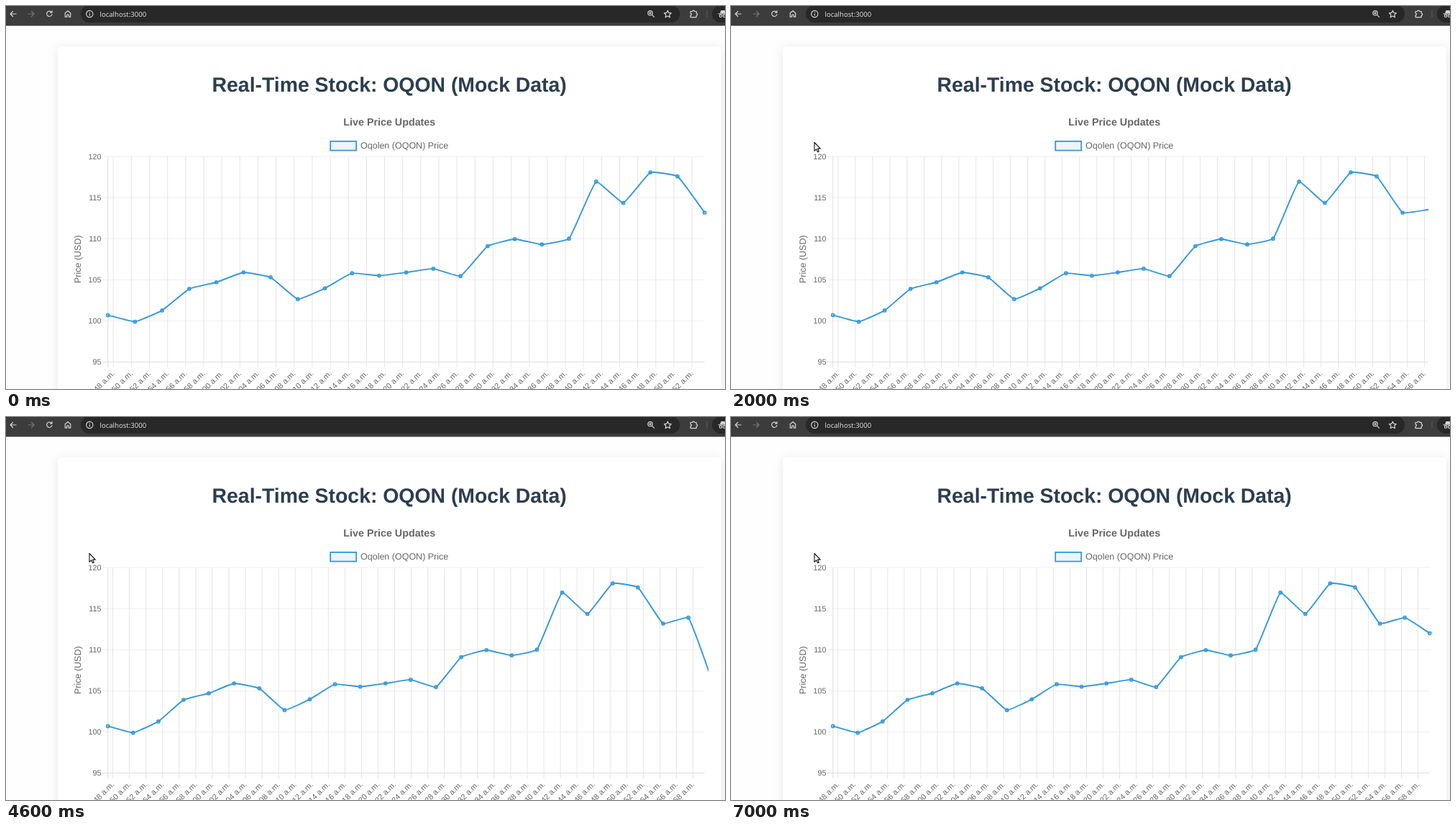
Animation of 1000x532 px, one loop 7.2 s. Source, as an HTML page:

```html
<!DOCTYPE html>
<html lang="en">
<head>
<meta charset="utf-8">
<title>Live price chart</title>
<style>
  html, body { margin: 0; width: 100%; height: 100%; overflow: hidden; background: #fefefe; }
  svg { display: block; width: 100%; height: 100%; }
  text { font-family: "Liberation Sans", Arial, sans-serif; fill: #666; text-rendering: geometricPrecision; }
  .icon { fill: none; stroke: #d4d4d4; stroke-width: 1.2; stroke-linecap: round; stroke-linejoin: round; }
  .small { font-size: 10.8px; }
  .mid { font-size: 12.5px; }
</style>
</head>
<body>
<svg viewBox="0 0 1000 532">
  <defs>
    <filter id="shadow" x="-5%" y="-10%" width="110%" height="120%">
      <feDropShadow dx="0" dy="3" stdDeviation="7" flood-color="#000" flood-opacity=".1"/>
    </filter>
    <clipPath id="area"><rect id="clip" x="136.4" y="203" height="297"/></clipPath>
  </defs>

  <rect width="1000" height="532" fill="#fefefe"/>
  <rect x="72" y="56" width="923" height="540" rx="6" fill="#fff" filter="url(#shadow)"/>

  <g id="toolbar">
    <rect width="1000" height="27.5" fill="#3c3c3c"/>
    <rect x="104" y="-1" width="833" height="24" rx="12" fill="#282828"/>
    <rect x="982" y="-1" width="40" height="24" rx="12" fill="#282828"/>
    <path class="icon" d="M14 11H6m3.500-3.500L6 11l3.500 3.500"/>
    <path class="icon" style="stroke:#777" d="M31 11h8m-3.500-3.500L39 11l-3.500 3.500"/>
    <path class="icon" d="M63.300 8.500A3.700 3.700 0 1 0 64 11.500M64 6.500v2.600h-2.600"/>
    <path class="icon" d="M82.300 9.800 86 6.700l3.700 3.100v5.400h-2.400v-3.200h-2.600v3.200h-2.400z"/>
    <circle class="icon" cx="116.300" cy="11" r="4.600"/>
    <path class="icon" d="M116.300 10.800v2.300m0-4.400v.1"/>
    <text x="130.500" y="14.600" style="font:9.600px 'Open Sans',sans-serif;fill:#e6e6e6">localhost:3000</text>
    <circle class="icon" cx="896" cy="9.800" r="3.200"/>
    <path class="icon" d="m898.500 12.300 3 3m-7-5.500h3m-1.500-1.500v3"/>
    <path class="icon" d="m920.300 6.200 1.500 3.200 3.500.4-2.600 2.400.7 3.500-3.100-1.800-3.100 1.800.7-3.500-2.600-2.400 3.500-.4z"/>
    <path class="icon" d="M952 7.500h2.700a1.400 1.400 0 0 1 2.800 0h2.700v2.600a1.400 1.400 0 0 1 0 2.800v2.700H952v-2.700a1.400 1.400 0 0 0 0-2.800z"/>
    <path d="M975 6v10" stroke="#5c5c5c"/>
    <path class="icon" d="M991 10.800h11"/>
    <path d="M993 10 994.500 6h5l1.500 4z" fill="#d4d4d4"/>
    <circle class="icon" cx="994" cy="13.800" r="1.700"/>
    <circle class="icon" cx="999" cy="13.800" r="1.700"/>
  </g>

  <g text-anchor="middle" font-weight="bold">
    <text x="533.2" y="118.800" style="font-size:28.400px;fill:#2c3e50">Real-Time Stock: OQON (Mock Data)</text>
    <text x="533.3" y="165.800" style="font-size:14.300px">Live Price Updates</text>
  </g>
  <rect x="451.2" y="187.900" width="36" height="12.700" fill="#ebf5fb" stroke="#3498db" stroke-width="1.800"/>
  <text class="mid" x="493" y="197.600">Oqolen (OQON) Price</text>
  <text class="mid" transform="translate(103.600 351.700) rotate(-90)" text-anchor="middle">Price (USD)</text>

  <path id="rows" stroke="#f2eeef" fill="none"/>
  <path id="cols" stroke="#e8e3e5" fill="none"/>
  <path id="axes" stroke="#e2dfdf" fill="none"/>
  <g id="prices" class="small" text-anchor="end"></g>
  <g id="times" class="small" text-anchor="end"></g>
  <path id="line" clip-path="url(#area)" fill="none" stroke="#3498db" stroke-width="1.900" stroke-linejoin="round"/>
  <g id="dots" fill="#3498db" fill-opacity=".45" stroke="#3498db" stroke-width="1.300"></g>
  <path id="cursor" d="M0 0V11.800L2.700 9.300 4.500 13.300 6.300 12.500 4.600 8.600H8.300Z" fill="#fff" stroke="#111" stroke-width="1.100" stroke-linejoin="round"/>
</svg>

<script>
const LOOP = 7200, STEP = 100, MOVE = 1000;
const LEFT = 141.7, TOP = 209, BOTTOM = 494.5, TENSION = 0.1;
const PRICES = [100.7, 99.9, 101.27, 103.9, 104.7, 105.9, 105.3, 102.65, 103.97, 105.8,
  105.5, 105.9, 106.35, 105.45, 109.1, 109.95, 109.3, 110, 116.94, 114.35,
  118.07, 117.58, 113.17, 113.9, 112];
// each stage: when it begins, how many points, right edge of the plot
const STAGES = [
  { at: -MOVE, count: 23, right: 971.7 },
  { at: 1370, count: 24, right: 969.3 },
  { at: 4380, count: 25, right: 971.7 }
];
// cursor path: time, x, y
const PATH = [[900, 40, 540], [1300, 134, 233], [1600, 116, 189.5]];

const $ = id => document.getElementById(id);
const mix = (a, b, k) => a + (b - a) * k;
const yOf = price => BOTTOM - (price - 95) * (BOTTOM - TOP) / 25;
const gap = s => (s.right - LEFT) / (s.count - 1);
const easeOut = k => 1 - (1 - Math.min(1, k)) ** 4;

function pointsAt(t, i) {
  const now = STAGES[i], old = STAGES[i - 1] || now;
  const k = easeOut((t - now.at) / MOVE);
  return PRICES.slice(0, now.count).map((p, n) => ({
    x: LEFT + n * mix(gap(old), gap(now), k),
    y: n < old.count ? yOf(p) : mix(BOTTOM, yOf(p), k)
  }));
}

function handles(a, b, c) {
  const d1 = Math.hypot(b.x - a.x, b.y - a.y), d2 = Math.hypot(c.x - b.x, c.y - b.y);
  const f = TENSION / (d1 + d2), dx = c.x - a.x, dy = c.y - a.y;
  return [b.x - f * d1 * dx, b.y - f * d1 * dy, b.x + f * d2 * dx, b.y + f * d2 * dy];
}

function curve(pts) {
  const h = pts.map((p, n) => handles(pts[n - 1] || p, p, pts[n + 1] || p));
  return pts.map((p, n) => n
    ? `C${h[n - 1][2]} ${h[n - 1][3]} ${h[n][0]} ${h[n][1]} ${p.x} ${p.y}`
    : `M${p.x} ${p.y}`).join("");
}

function drawGrid({ count, right }) {
  const perSecond = (right - LEFT) / (count - 1) / 3;
  let rows = "", cols = "", labels = "";
  for (let p = 100; p <= 120; p += 5) rows += `M134 ${yOf(p)}H${right}`;
  for (let s = 0; s + 0.6 <= (count - 1) * 3; s += 2) {
    const x = LEFT + (s + 0.6) * perSecond;
    const sec = String((48 + s) % 60).padStart(2, "0");
    cols += `M${x} ${TOP}V502`;
    labels += `<text transform="translate(${x + 2.5} 511) rotate(-45)">:${sec} a.m.</text>`;
  }
  $("rows").setAttribute("d", rows);
  $("cols").setAttribute("d", cols);
  $("axes").setAttribute("d", `M${LEFT} ${TOP}V502M134 ${BOTTOM}H${right}`);
  $("times").innerHTML = labels;
  $("clip").setAttribute("width", right + 5.3 - 136.4);
}

function moveCursor(t) {
  const n = PATH.findIndex(p => t < p[0]);
  let [, x, y] = PATH[n < 0 ? PATH.length - 1 : n];
  if (n > 0) {
    const a = PATH[n - 1], b = PATH[n], k = (t - a[0]) / (b[0] - a[0]);
    x = mix(a[1], b[1], k);
    y = mix(a[2], b[2], k);
  }
  $("cursor").setAttribute("transform", `translate(${x} ${y})`);
}

let shown = -1;
function render(t) {
  const i = STAGES.findLastIndex(s => t >= s.at);
  if (i !== shown) drawGrid(STAGES[shown = i]);
  const pts = pointsAt(t, i);
  $("line").setAttribute("d", curve(pts));
  $("dots").innerHTML = pts.filter(p => p.x <= STAGES[i].right + 0.5)
    .map(p => `<circle cx="${p.x}" cy="${p.y}" r="2.2"/>`).join("");
  moveCursor(t);
}

for (let p = 95; p <= 120; p += 5)
  $("prices").innerHTML += `<text x="132.500" y="${yOf(p) + 3.6}">${p}</text>`;

const start = performance.now();
function tick() {
  const t = (performance.now() - start) % LOOP;
  render(Math.floor(t / STEP) * STEP);
  requestAnimationFrame(tick);
}
tick();
</script>
</body>
</html>
```
